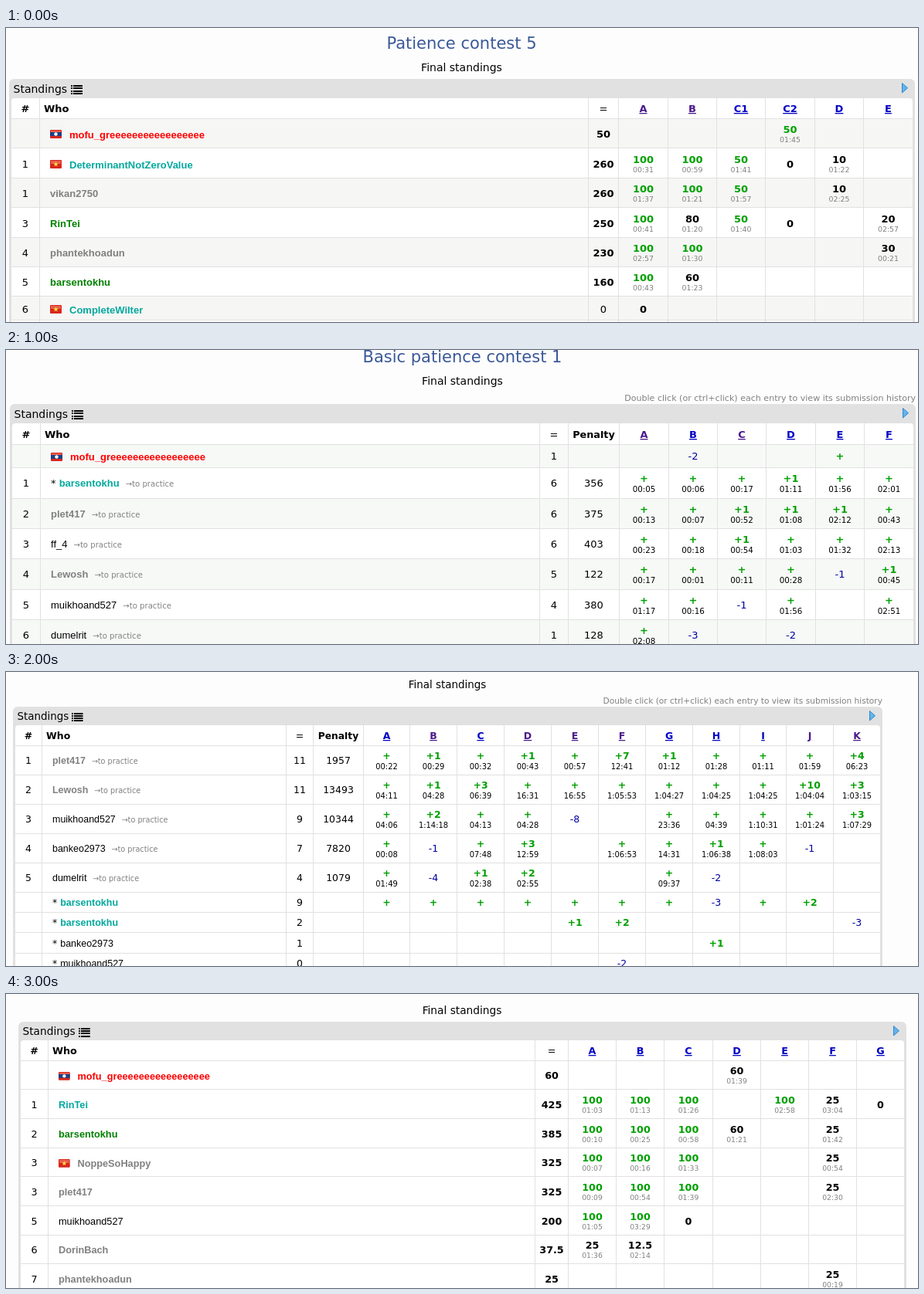
These frames come from a looping animation (1180 by 381 pixels, 4 s). An HTML page:

```html
<!DOCTYPE html>
<html lang="en">
<head>
<meta charset="utf-8">
<title>Final standings</title>
<style>
html, body { margin: 0; width: 100%; height: 100%; overflow: hidden; background: #fdfdfd; }
svg { display: block; font-family: Verdana, "DejaVu Sans", sans-serif; }
.m { text-anchor: middle; }
.e { text-anchor: end; }
.b { font-weight: bold; }
.u { font-weight: bold; text-decoration: underline; }
.n { font-family: Arial, "Liberation Sans", sans-serif; }
.v { font-family: Verdana, "DejaVu Sans", sans-serif; font-weight: normal; }
</style>
</head>
<body>
<svg id="stage" width="1180" height="381" viewBox="0 0 1180 381"></svg>
<script>
const LINE = '#e1e1e1', GREEN = '#00a000', GRAY = '#808080', BLUE = '#0000c4', VISITED = '#4a1a8c';
const NAME_COLORS = { r: '#f00', c: '#03a89e', y: '#808080', g: '#008000', k: '#000' };
const neko = 'rLmofu_gr' + 'e'.repeat(17);

// Row: rank; name; total; penalty; cells.
// Name: colour letter, flag (L, V or -), "*" for virtual, ">" for a practice link.
// Cell: result and time; "g" marks a full score.
const scenes = [
  {
    k: 1, title: ['Patience contest 5', 589.5, 27], sub: [589.5, 56],
    box: [4, 66, 1176], fixed: [43, 753], first: 792.2, pitch: 63.4,
    ys: [91, 117, 155, 194, 232, 271, 309, 347, 378, 417],
    heads: 'A B C1 C2 D E', visited: 'AB', score: true, stripe: '#f6f6f5', base: 5.7, top: -.3, low: 11.7,
    rows: [
      `;${neko};50;;,,,g50 01:45`,
      '1;cVDeterminantNotZeroValue;260;;g100 00:31,g100 00:59,g50 01:41,0,10 01:22',
      '1;y-vikan2750;260;;g100 01:37,g100 01:21,g50 01:57,,10 02:25',
      '3;g-RinTei;250;;g100 00:41,80 01:20,g50 01:40,0,,20 02:57',
      '4;y-phantekhoadun;230;;g100 02:57,g100 01:30,,,,30 00:21',
      '5;g-barsentokhu;160;;g100 00:43,60 01:23',
      '6;cVCompleteWilter;0;;0'
    ]
  },
  {
    k: 1, title: ['Basic patience contest 1', 590.5, 16], sub: [590.5, 45], hint: 66,
    box: [5, 70, 1177], fixed: [44, 690, 727], first: 793.2, pitch: 63.4,
    ys: [95, 122, 152, 192, 231, 270, 310, 349, 388],
    heads: 'A B C D E F', visited: 'AC', stripe: '#f7f9f7', base: 4.8, top: -1.2, low: 11.8,
    rows: [
      `;${neko};1;;,-2,,,+`,
      '1;c-*barsentokhu>;6;356;+ 00:05,+ 00:06,+ 00:17,+1 01:11,+ 01:56,+ 02:01',
      '2;y-plet417>;6;375;+ 00:13,+ 00:07,+1 00:52,+1 01:08,+1 02:12,+ 00:43',
      '3;k-ff_4>;6;403;+ 00:23,+ 00:18,+1 00:54,+ 01:03,+ 01:32,+ 02:13',
      '4;y-Lewosh>;5;122;+ 00:17,+ 00:01,+ 00:11,+ 00:28,-1,+1 00:45',
      '5;k-muikhoand527>;4;380;+ 01:17,+ 00:16,-1,+ 01:56,,+ 02:51',
      '6;k-dumelrit>;1;128;+ 02:08,-3,,-2'
    ]
  },
  {
    k: .96, sub: [571, 21], hint: 41,
    box: [9, 45, 1134], fixed: [46, 362, 397], first: 461.6, pitch: 60.87,
    ys: [69, 95, 133, 171, 209, 247, 285, 311, 337, 364, 390],
    heads: 'A B C D E F G H I J K', visited: 'BDEFJK', stripe: '#fff', base: 4.5, top: -1.5, low: 11,
    rows: [
      '1;y-plet417>;11;1957;+ 00:22,+1 00:29,+ 00:32,+1 00:43,+ 00:57,+7 12:41,+1 01:12,+ 01:28,+ 01:11,+ 01:59,+4 06:23',
      '2;y-Lewosh>;11;13493;+ 04:11,+1 04:28,+3 06:39,+ 16:31,+ 16:55,+ 1:05:53,+ 1:04:27,+ 1:04:25,+ 1:04:25,+10 1:04:04,+3 1:03:15',
      '3;k-muikhoand527>;9;10344;+ 04:06,+2 1:14:18,+ 04:13,+ 04:28,-8,,+ 23:36,+ 04:39,+ 1:10:31,+ 1:01:24,+3 1:07:29',
      '4;k-bankeo2973>;7;7820;+ 00:08,-1,+ 07:48,+3 12:59,,+ 1:06:53,+ 14:31,+1 1:06:38,+ 1:08:03,-1',
      '5;k-dumelrit>;4;1079;+ 01:49,-4,+1 02:38,+2 02:55,,,+ 09:37,-2',
      ';c-*barsentokhu;9;;+,+,+,+,+,+,+,-3,+,+2',
      ';c-*barsentokhu;2;;,,,,+1,+2,,,,,-3',
      ';k-*bankeo2973;1;;,,,,,,,+1',
      ';k-*muikhoand527;0;;,,,,,-2'
    ]
  },
  {
    k: .98, sub: [590, 26],
    box: [16, 36, 1165], fixed: [54, 684], first: 727, pitch: 62.2,
    ys: [60, 86, 123, 161, 199, 236, 274, 312, 349, 387],
    heads: 'A B C D E F G', visited: '', score: true, stripe: '#fff', base: 5, top: -.7, low: 11.4,
    rows: [
      `;${neko};60;;,,,60 01:39`,
      '1;c-RinTei;425;;g100 01:03,g100 01:13,g100 01:26,,g100 02:58,25 03:04,0',
      '2;g-barsentokhu;385;;g100 00:10,g100 00:25,g100 00:58,60 01:21,,25 01:42',
      '3;yVNoppeSoHappy;325;;g100 00:07,g100 00:16,g100 01:33,,,25 00:54',
      '3;y-plet417;325;;g100 00:09,g100 00:54,g100 01:39,,,25 02:30',
      '5;k-muikhoand527;200;;g100 01:05,g100 03:29,0',
      '6;y-DorinBach;37.5;;25 01:36,12.5 02:14',
      '7;y-phantekhoadun;25;;,,,,,25 00:19'
    ]
  }
];

const rect = (x, y, w, h, fill, rx = 0) =>
  `<rect x="${x}" y="${y}" width="${w}" height="${h}" rx="${rx}" fill="${fill}"/>`;
const text = (s, x, y, size, cls = '', fill = '#000') =>
  `<text x="${x}" y="${Math.round(y)}" font-size="${size}" class="${cls}" fill="${fill}">${s}</text>`;

function flag(kind, x, y, k) {
  let art = rect(0, 0, 15, 11, '#d8261c', 1) + rect(1, 1, 13, 4, '#e8604f');
  if (kind === 'L') {
    art += rect(0, 3, 15, 5, '#1d3f86') + '<circle cx="7.5" cy="5.5" r="2.2" fill="#fff"/>';
  } else {
    const star = Array.from({ length: 10 }, (_, i) => {
      const a = i * Math.PI / 5, r = i % 2 ? 1.4 : 3.5;
      return [7.5 + r * Math.sin(a), 5.7 - r * Math.cos(a)];
    });
    art += `<polygon points="${star.join(' ')}" fill="#ffe13a"/>`;
  }
  return `<g transform="translate(${x} ${y}) scale(${k})">${art}</g>`;
}

function nameCell(spec, x, mid, s) {
  const [, color, kind, virtual, name, practice] = spec.match(/^(\w)([LV-])(\*?)(.*?)(>?)$/);
  const { k, base } = s, flagged = kind !== '-';
  const star = virtual && `<tspan class="v" fill="#000">* </tspan>`;
  const link = practice &&
    `<tspan class="v" fill="${GRAY}" dx="${8 * k}" font-size="${10.1 * k}">→to practice</tspan>`;
  return (flagged ? flag(kind, x, Math.round(mid - 4.2), k) : '') +
    text(star + name + link, x + (flagged ? 25 * k : 0), mid + base + (flagged ? 1 : 0), 13 * k,
      color === 'k' ? 'n' : 'n b', NAME_COLORS[color]);
}

function resultCell(cell, x, mid, s) {
  if (!cell) return '';
  const [mark, time] = cell.split(' '), size = 13 * s.k;
  const failed = mark[0] === '-';
  const fill = failed ? '#0000a0' : /^[g+]/.test(mark) ? GREEN : '#000';
  const out = text(mark.replace('g', ''), x, mid + (time ? s.top : s.base), size, failed ? 'm' : 'm b', fill);
  if (!time) return out;
  return out + text(time, x, mid + s.low, (s.score ? 9.4 : 10.3) * s.k, 'm', s.score ? GRAY : '#000');
}

function panel([left, top, right], k) {
  let out = rect(left, top, right - left, 400, LINE, 6) + text('Standings', left + 5.5, top + 17.7 * k, 14 * k);
  const x = Math.round(left + 80 * k - (1 - k) * 20);
  for (let i = 0; i < 4; i++) {
    const y = Math.round(top + 8 * k + i * 3.3 * k);
    out += rect(x, y, 2, 2, '#000') + rect(x + 3, y, 12 * k, 2, '#000');
  }
  return out + `<path d="M${right - 16.5} ${top + 5.5}l7 6.2l-7 6.2z" fill="#62b4ee" stroke="#2f86cf"/>`;
}

function draw(s) {
  const { k, ys, box, fixed } = s, heads = s.heads.split(' ');
  const [left, , right] = box, size = 13 * k, headY = (ys[0] + ys[1]) / 2 + 5;
  const firsts = heads.map((_, i) => Math.round(s.first + i * s.pitch));
  const xs = [left + 2, ...fixed, ...firsts, right - 3];
  const center = i => (xs[i] + 1 + xs[i + 1]) / 2;
  const nameX = fixed[0] + 14, offset = fixed.length + 1;
  let out = s.title ? text(s.title[0], s.title[1], s.title[2], 21, 'm', '#3b5998') : '';
  out += text('Final standings', ...s.sub, 14 * k, 'm');
  if (s.hint) {
    out += text('Double click (or ctrl+click) each entry to view its submission history',
      right, s.hint, 11.07 * k, 'e', GRAY);
  }
  out += panel(box, k) + rect(left + 3, ys[0], right - left - 6, 400, '#fff', 4);

  for (let i = 1; i < ys.length - 1; i++) {
    if (i % 2) out += rect(left + 3, ys[i], right - left - 6, ys[i + 1] - ys[i], s.stripe);
  }
  for (const y of ys.slice(1)) out += rect(left + 3, y, right - left - 6, 1, LINE);
  for (const x of xs.slice(1, -1)) out += rect(x, ys[0], 1, 400, LINE);

  out += text('#', center(0), headY, size, 'm b') + text('Who', fixed[0] + 6, headY, size, 'b') +
    text('=', center(2), headY, size, 'm');
  if (fixed[2]) out += text('Penalty', center(3), headY, 12.8 * k, 'm b');
  heads.forEach((h, i) => {
    out += text(h, center(offset + i), headY, size, 'u m', s.visited.includes(h) ? VISITED : BLUE);
  });

  s.rows.forEach((row, r) => {
    const [rank, name, total, penalty, cells] = row.split(';');
    const mid = (ys[r + 1] + 1 + ys[r + 2]) / 2, y = mid + s.base;
    out += text(rank, center(0), y, size, 'm') + nameCell(name, nameX, mid, s) +
      text(total, center(2), y, size, s.score && total !== '0' ? 'm b' : 'm');
    if (penalty) out += text(penalty, center(3), y, size, 'm');
    cells.split(',').forEach((c, i) => { out += resultCell(c, center(offset + i), mid, s); });
  });
  return `<g visibility="hidden">${out}</g>`;
}

const stage = document.getElementById('stage');
stage.innerHTML = scenes.map(draw).join('');
const groups = [...stage.children];

function frame() {
  const now = Math.floor(performance.now() % 4000 / 1000);
  groups.forEach((g, i) => g.setAttribute('visibility', i === now ? 'visible' : 'hidden'));
  requestAnimationFrame(frame);
}
frame();
</script>
</body>
</html>
```
